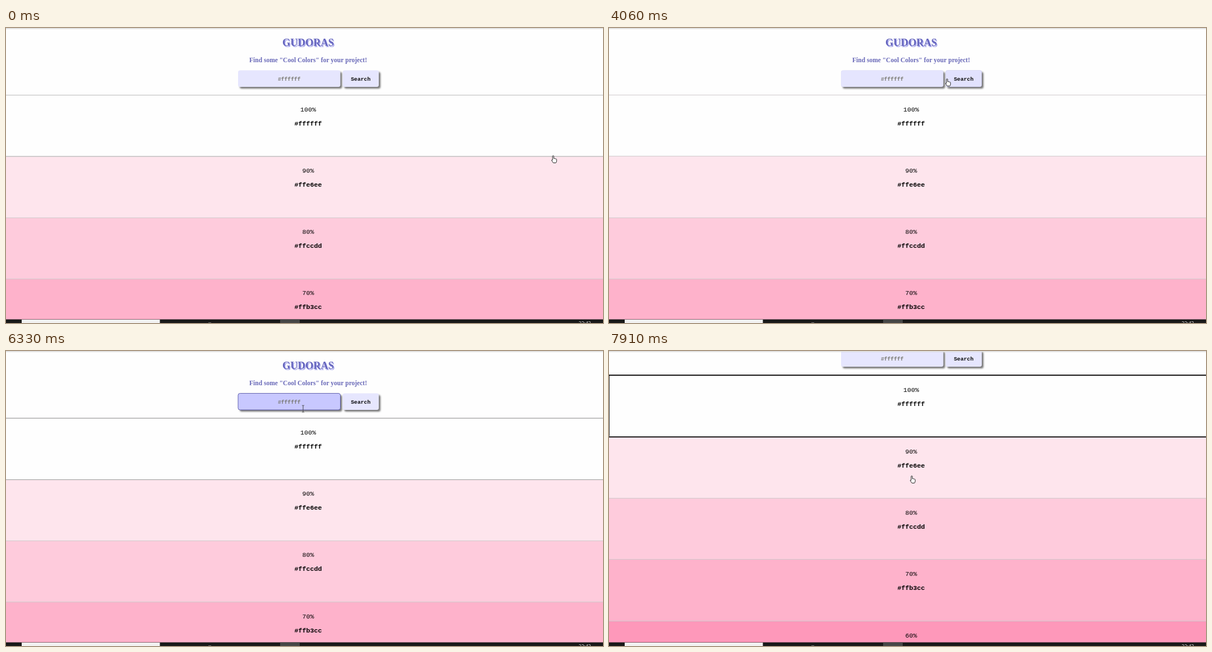
An HTML page with a canvas for the animation above (8000 ms loop, 1065 by 526 pixels).

```html
<!DOCTYPE html>
<html lang="en">
<head>
<meta charset="utf-8">
<title>Color shades</title>
<style>
  html, body { margin: 0; width: 100%; height: 100%; overflow: hidden; background: #fefefe; }
  canvas { display: block; }
</style>
</head>
<body>
<canvas id="stage" width="1065" height="526"></canvas>
<script>
const ctx = document.getElementById('stage').getContext('2d');
const W = 1065, H = 526, MID = 539, LOOP = 8000;
const SERIF = '"Liberation Serif", "Times New Roman", serif';
const MONO = '"Liberation Mono", "Courier New", monospace';
const SANS = '"Open Sans", "Noto Sans", sans-serif';
const ROW_COUNT = 5, ROW_TOP = 119.5, ROW_STEP = 109.25;

// Hover areas; fade is the length of the hover transition in ms.
const title = { x: 493, y: 18, w: 93, h: 18, fade: 400 };
const input = { x: 414, y: 75.5, w: 182.5, h: 29.5, fade: 100 };
const button = { x: 600.5, y: 75.5, w: 64.5, h: 29.5, fade: 500 };
const firstRow = { x: 0, y: ROW_TOP, w: W, h: ROW_STEP + 2, fade: 500 };

// The cursor rests at each stop and glides to the next, arriving at the given time.
const GLIDE = 500;
const STOPS = [
  { at: 0, x: 978, y: 234 },
  { at: 1530, x: 646, y: 95 },
  { at: 2330, x: 539, y: 39 },
  { at: 3260, x: 533, y: 84 },
  { at: 4060, x: 605, y: 97 },
  { at: 5300, x: 542, y: 156 },
  { at: 6150, x: 530, y: 103 },
  { at: 7400, x: 542, y: 229 },
];

const HAND = new Path2D('M-3 1.5V-5.2a1.1 1.1 0 0 1 2.2 0V-1.2q1-.7 1.8 .2q1-.5 1.7 .4q1.2-.3 1.5 .8' +
  'V3q0 2-1.3 3.5H-1.6L-4.6 2.2q-.4-1.4 1.6-.7z');
const ARROW = new Path2D('M-4-6V4.5l2.5-2.2 1.7 3.9 1.7-.8-1.7-3.7h3.4z');
const BEAM = new Path2D('M-2-6H-.5L0-5.5 .5-6H2M0-5.5V5.5M-2 6H-.5L0 5.5 .5 6H2');

const clamp = k => Math.min(1, Math.max(0, k));
const mix = (a, b, k) => a + (b - a) * k;
const ease = k => k * k * (3 - 2 * k);
const blend = (a, b, k) => `rgb(${a.map((v, i) => Math.round(mix(v, b[i], k)))})`;

function cursorAt(t) {
  return STOPS.reduce((from, to) => {
    const k = ease(clamp((t - to.at) / GLIDE + 1));
    return { x: mix(from.x, to.x, k), y: mix(from.y, to.y, k) };
  });
}

function pointsAt(area, t) {
  const { x, y } = cursorAt(t);
  const dx = x - 2 - area.x, dy = y - 5 - area.y;
  return t > 0 && dx > 0 && dx < area.w && dy > 0 && dy < area.h;
}

// Share of the last fade period that the cursor spent inside the area.
function hoverOf(area, t, samples = 40) {
  let hits = 0;
  for (let i = 0; i < samples; i++) hits += pointsAt(area, t - area.fade * i / samples);
  return hits / samples;
}

function rect(x, y, w, h, color) {
  ctx.fillStyle = color;
  ctx.fillRect(x, y, w, h);
}

function label(text, x, y, font, color, align = 'center') {
  ctx.font = font;
  ctx.textAlign = align;
  ctx.fillStyle = color;
  ctx.fillText(text, x, y);
}

function field({ x, y, w, h }, text, color, hover) {
  ctx.beginPath();
  ctx.roundRect(x, y, w, h, 3.5);
  ctx.save();
  ctx.shadowColor = '#777';
  ctx.shadowOffsetX = ctx.shadowOffsetY = 3;
  ctx.shadowBlur = 3;
  ctx.fillStyle = blend([230, 230, 254], [200, 200, 255], hover);
  ctx.fill();
  ctx.restore();
  ctx.strokeStyle = `rgba(85,85,165,${hover})`;
  ctx.lineWidth = .9;
  ctx.stroke();
  label(text, x + w / 2, 93.5, `bold 9.7px ${MONO}`, color);
}

function header(t) {
  const hover = hoverOf(title, t);
  const font = `bold 18.4px ${SERIF}`;
  label('GUDORAS', MID + 1.6, 33.9, font, blend([168, 168, 236], [226, 172, 212], hover));
  label('GUDORAS', MID, 32.4, font, blend([102, 102, 190], [199, 31, 128], hover));
  label('Find some "Cool Colors" for your project!', MID, 61, `bold 11.5px ${SERIF}`, '#6969b8');
  field(input, '#ffffff', '#77776f', hoverOf(input, t));
  field(button, 'Search', '#080808', hoverOf(button, t));
}

function rows(hover) {
  for (let i = 0; i < ROW_COUNT; i++) {
    const shade = [255, Math.round(255 - 25.5 * i), 255 - 17 * i];
    const hex = '#' + shade.map(v => v.toString(16)).join('');
    const top = ROW_TOP + i * ROW_STEP;
    const edge = Math.round(top - .3 + (i && hover * 1.5));
    const base = Math.round(top + 29 + hover * (i ? 2 : 1));
    rect(0, edge, W, ROW_STEP + 2, blend(shade, [0, 0, 0], .005));
    rect(0, edge, W, 1, '#cfcacc');
    label(`${100 - 10 * i}%`, MID, base, `11.67px ${MONO}`, '#000');
    label(hex, MID, base + 25, `bold 11.67px ${MONO}`, '#000');
  }
}

function rowOutline(hover) {
  const color = blend([204, 204, 204], [0, 0, 0], hover);
  const size = mix(1, 1.8, hover);
  const bottom = ROW_TOP + ROW_STEP + hover * .6;
  rect(0, ROW_TOP - .2, W, size, color);
  rect(0, bottom, W, size, color);
  if (hover === 1) rect(0, ROW_TOP, .8, ROW_STEP, color);
}

function statusBar() {
  ctx.beginPath();
  ctx.roundRect(-2, 504.5, 137, 17, [0, 3, 0, 0]);
  ctx.fillStyle = '#dee1e6';
  ctx.fill();
  ctx.strokeStyle = '#b9bcc1';
  ctx.lineWidth = 1;
  ctx.stroke();
  label('https://modvi.test/Temolaj/Gudoras', 129.5, 515, `8.6px ${SANS}`, '#55585c', 'right');
}

function taskbar() {
  rect(0, 519.5, W, 7, '#191919');
  rect(28, 520, 246.5, 6, '#f2f2f2');
  rect(489, 519.5, 35, 7, '#474747');
  rect(361, 525, 5, 1, '#777');
  label('22:43', 1032.5, 530, `8.6px ${SANS}`, '#eee');
}

function cursor(t) {
  const { x, y } = cursorAt(t);
  ctx.save();
  ctx.translate(x, y);
  ctx.lineWidth = 1;
  ctx.lineJoin = 'round';
  if (pointsAt(input, t)) {
    ctx.strokeStyle = '#444';
    ctx.stroke(BEAM);
  } else {
    const link = y > ROW_TOP + 5 || pointsAt(title, t) || pointsAt(button, t);
    const shape = link ? HAND : ARROW;
    ctx.fillStyle = '#fff';
    ctx.strokeStyle = '#222';
    ctx.fill(shape);
    ctx.stroke(shape);
  }
  ctx.restore();
}

function draw(now) {
  const t = now % LOOP;
  const scroll = Math.floor(77 * clamp((t - 7713) / 197) ** 2);
  // Scrolling moves the page, not the row that is lit.
  const rowHover = hoverOf(firstRow, t);
  rect(0, 0, W, H, '#fefefe');
  ctx.save();
  ctx.translate(0, -scroll);
  header(t);
  rows(rowHover);
  if (rowHover) rowOutline(rowHover);
  ctx.restore();
  rect(0, 0, W, 1, '#fefefe');
  rect(0, .5, W, 1.2, '#d2d2d2');
  if (hoverOf(title, t) > .25) statusBar();
  taskbar();
  cursor(t);
}

const start = performance.now();
function loop() {
  draw(performance.now() - start);
  requestAnimationFrame(loop);
}
loop();
</script>
</body>
</html>
```
